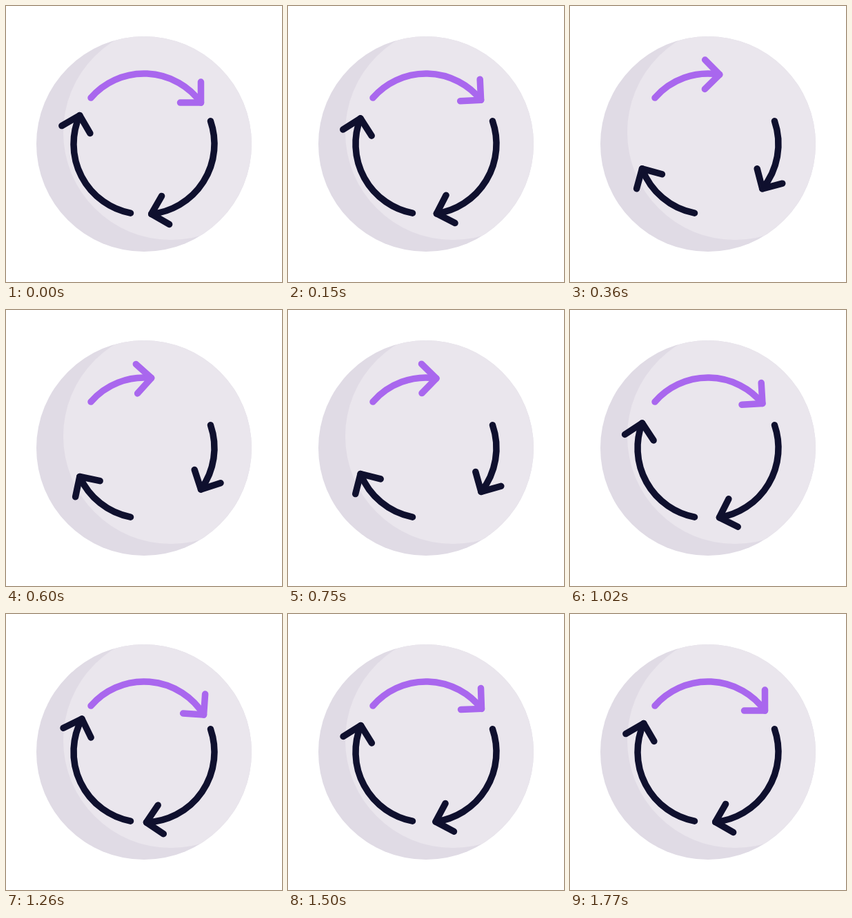
An HTML page for the animation above (3.8 s loop, 400 by 400 pixels).

```html
<!DOCTYPE html>
<html lang="en">
<head>
<meta charset="utf-8">
<title>Cycle arrows</title>
<style>
  html, body { margin: 0; width: 100%; height: 100%; overflow: hidden; background: #fff; }
  svg { display: block; width: 100%; height: 100%; }
  .arrow { fill: none; stroke: #0f102e; stroke-width: 9.5; stroke-linecap: round; stroke-linejoin: round; }
  .accent { stroke: #a967ee; }
</style>
</head>
<body>
<svg viewBox="0 0 400 400">
  <clipPath id="disc"><circle cx="200" cy="200" r="156"/></clipPath>
  <circle cx="200" cy="200" r="156" fill="#e0dbe5"/>
  <circle cx="239" cy="183" r="156" fill="#eae6ed" clip-path="url(#disc)"/>
  <g class="arrow" transform="translate(200 200)">
    <g transform="rotate(120)"><path class="arc"/><path class="head"/></g>
    <g transform="rotate(240)"><path class="arc"/><path class="head"/></g>
    <g class="accent"><path class="arc"/><path class="head"/></g>
  </g>
</svg>
<script>
const LOOP = 3800, STEP = 30;
const RADIUS = 102, START = -139, REST = -36, PULL = -48;
const PULLED = 520, RELEASED = 854, SETTLED = 1770;
const arcs = document.querySelectorAll('.arc');
const heads = document.querySelectorAll('.head');
const rad = degrees => degrees * Math.PI / 180;
const point = (r, degrees) =>
  `${(r * Math.cos(rad(degrees))).toFixed(2)} ${(r * Math.sin(rad(degrees))).toFixed(2)}`;

const easeInOut = x => x < 0.5 ? 8 * x ** 4 : 1 - 8 * (1 - x) ** 4;

// Degrees between the arrow tip and its resting place.
function offset(t) {
  if (t < PULLED) return PULL * easeInOut(t / PULLED);
  if (t < RELEASED) return PULL * (1 - ((t - PULLED) / (RELEASED - PULLED)) ** 8);
  if (t >= SETTLED) return 0;
  const s = (t - RELEASED) / 1000;
  return 25 * Math.exp(-4 * s) * Math.sin(rad(2080 * s));
}

function draw(now) {
  const t = Math.floor(now % LOOP / STEP) * STEP;
  const tip = REST + offset(t);
  const arc = `M${point(RADIUS, START)}A${RADIUS} ${RADIUS} 0 0 1 ${point(RADIUS, tip)}`;
  arcs.forEach(path => path.setAttribute('d', arc));
  heads.forEach(path => path.setAttribute('transform', `rotate(${tip})`));
  requestAnimationFrame(draw);
}

heads.forEach(path => path.setAttribute('d', `M119.6 -24.3L${RADIUS} 0L77.7 -17.6`));
draw(0);
</script>
</body>
</html>
```
